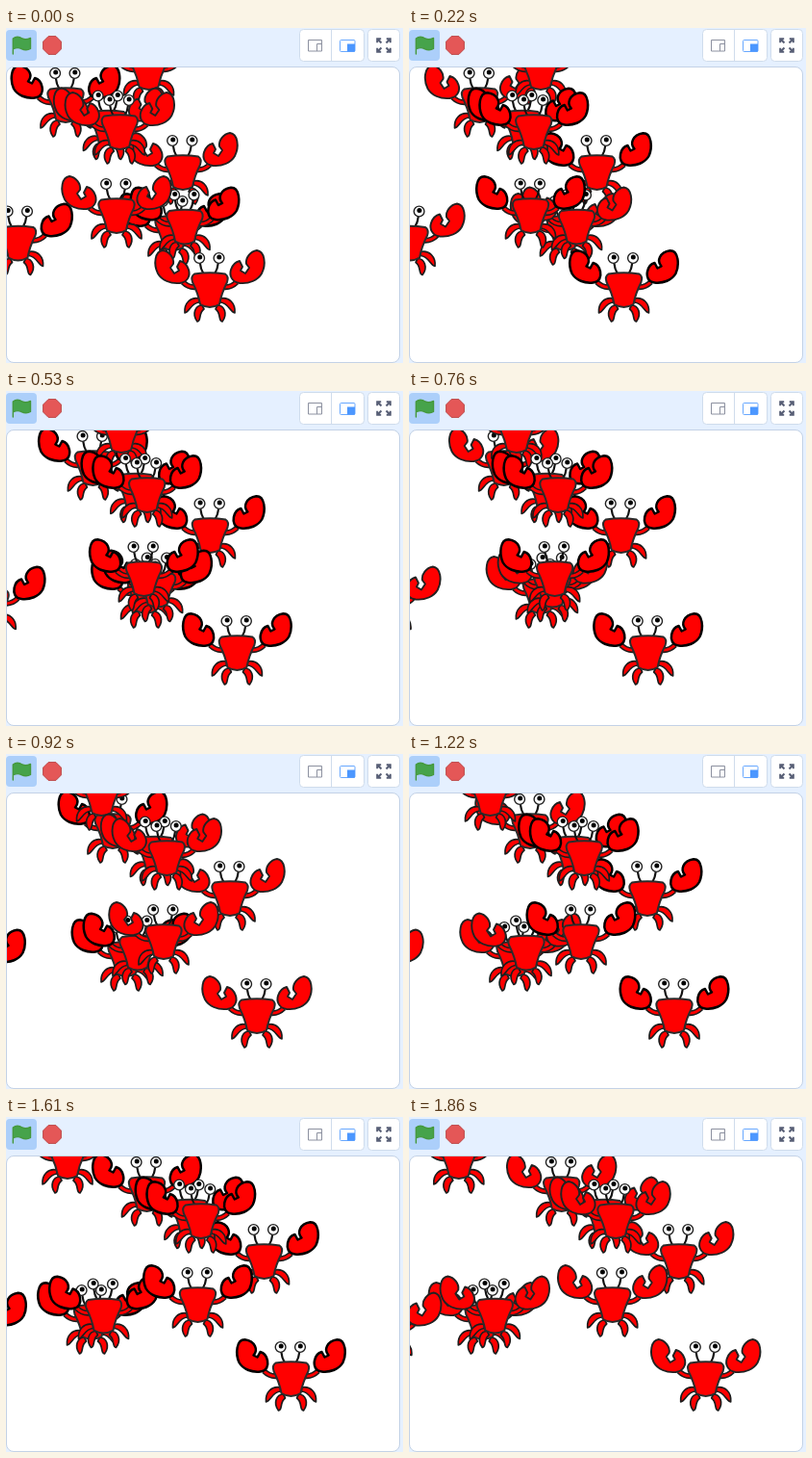
Recreate the animation shown at these times as an HTML page. Size 413 by 348 pixels, loop 1930 ms.

```html
<!DOCTYPE html>
<html lang="en">
<head>
<meta charset="utf-8">
<title>Crabs</title>
<style>
html, body { margin: 0; width: 100%; height: 100%; overflow: hidden; background: #e5f0ff; }
svg { display: block; width: 413px; height: 348px; }
</style>
</head>
<body>
<svg viewBox="0 0 413 348" xmlns="http://www.w3.org/2000/svg">
  <defs>
    <clipPath id="stage"><rect x="1" y="41" width="408.5" height="306" rx="7"/></clipPath>
    <g id="limbs" fill="#f00" stroke="#1c1c1c" stroke-width="1.7" stroke-linejoin="round">
      <path d="M11 13C20 11 27 18 26 28C21 27 20 18 11 17Z"/>
      <path d="M8 20C15 20 19 29 13 37C8.500 36 12 28 6 24Z"/>
      <path d="M14 1Q22 2 28 -4" fill="none" stroke-width="6"/>
      <path d="M14 1Q22 2 28 -4" fill="none" stroke="#f00" stroke-width="2.6"/>
    </g>
    <g id="eye">
      <path d="M9.500 -24Q9 -18 5.500 -12" fill="none" stroke="#111" stroke-width="2.2"/>
      <circle cx="10.2" cy="-29" r="5.4" fill="#fff" stroke="#222" stroke-width="1.4"/>
    </g>
    <g id="body">
      <use href="#limbs"/>
      <use href="#limbs" transform="scale(-1 1)"/>
      <g transform="translate(-.7)">
        <use href="#eye"/>
        <use href="#eye" transform="scale(-1 1)"/>
        <circle cx="-9.600" cy="-30" r="2.5"/>
        <circle cx="10.500" cy="-30" r="2.5"/>
      </g>
      <path d="M-16 -12.500Q0 -15 16 -12.500Q20 -10 18 -4Q12 8 10 19Q0 25 -10 19Q-12 8 -18 -4Q-20 -10 -16 -12.500Z" fill="#f00" stroke="#2b2b2b" stroke-width="2"/>
    </g>
    <path id="openClaw" fill="#f00" stroke="#222" stroke-width="1.9" stroke-linejoin="round" d="M49 -37C57 -36 59 -23 54 -13C50 -6 41 -2 31 -3C23 -4 20 -11 22 -17C24 -23 27 -25 31 -26L34 -20L32 -16L37 -13L41 -19L38 -23C37 -29 42 -36 49 -37Z"/>
    <path id="closedClaw" fill="#f00" stroke="#000" stroke-width="2.5" stroke-linejoin="round" d="M48 -36.800C57 -37 58 -22 54 -13C50 -6 41 -2.500 32 -3.500C25 -4 23.500 -10 24.500 -15C25.500 -20 28 -23 32 -24L35 -18.500L39 -20.500C34 -26 37 -35 48 -36.800Z"/>
    <g id="open">
      <use href="#body"/>
      <use href="#openClaw"/>
      <use href="#openClaw" transform="scale(-1 1)"/>
    </g>
    <g id="closed">
      <use href="#body"/>
      <use href="#closedClaw"/>
      <use href="#closedClaw" transform="scale(-1 1)"/>
    </g>
    <path id="arrow" d="M2.500 -2.500L6.500 -6.500M2.800 -6.800H6.800V-2.800" fill="none" stroke="#575e75" stroke-width="2"/>
  </defs>

  <rect width="413" height="348" fill="#e5f0ff"/>
  <rect x="0" y="2" width="32" height="32" rx="4" fill="#accffa"/>
  <path d="M7.300 27V11C11 8 14 9 17 11C20 12.500 22 12 25.500 10.500V21.500C22 23.500 19 23 16 21.500C13 20 10 20.500 7.300 22" fill="#46a34b" stroke="#45993d" stroke-width="1.4" stroke-linecap="round" stroke-linejoin="round"/>
  <path d="M44.100 8.600H51.900L57.400 14.100V21.900L51.900 27.400H44.100L38.600 21.900V14.100Z" fill="#e45757" stroke="#bd4b4b" stroke-linejoin="round"/>

  <g fill="#fff" stroke="#cfdcec">
    <rect x="305.500" y="1.500" width="67" height="33" rx="4"/>
    <path d="M338.500 2V34"/>
    <rect x="376.500" y="1.500" width="33" height="33" rx="4"/>
  </g>
  <path d="M314.500 12.500H328.500V24H314.500ZM323.500 24V16.500H328.500" fill="#fff" stroke="#8c91a0"/>
  <rect x="347.500" y="12.500" width="15.500" height="12" rx="1" fill="#fff" stroke="#68a8ff"/>
  <rect x="355" y="16.500" width="8" height="8" fill="#4c97ff"/>
  <g transform="translate(393 18)">
    <use href="#arrow"/>
    <use href="#arrow" transform="rotate(90)"/>
    <use href="#arrow" transform="rotate(180)"/>
    <use href="#arrow" transform="rotate(270)"/>
  </g>

  <rect x=".5" y="40.500" width="409" height="307" rx="7.500" fill="#fff" stroke="#c3d2e6"/>
  <g clip-path="url(#stage)"><g id="crabs"></g></g>
</svg>
<script>
const LOOP = 1930;
const SNAP = 500; // one open-and-close of the claws
const starts = [0, 80, 150, 220, 300, 380, 450, 530, 610, 690, 770, 840, 920,
  990, 1070, 1150, 1220, 1300, 1380, 1460, 1530, 1610, 1700, 1780, 1860];
// Distance walked, as [step, pixels]
const walk = [[0, 0], [3, 11.5], [7, 28.4], [12, 49], [16, 64], [21, 84.5], [24, 96.7]];

const right = x => d => x + d;
const left = x => d => x - d;
// Held at the stage edge before turning back
const bounce = d => Math.max(12.5 - d, d - 120, -42);

// Times at which the claws open, for the two groups of crabs
const early = 140, late = 265;

// Back to front: [x as a function of distance, y, opening time]
const crabs = [
  [right(62), 76, early],
  [left(148.5), 42, early],
  [right(184), 146, late],
  [left(174), 209, early],
  [left(186), 202.5, early],
  [bounce, 219.5, early],
  [right(115), 191, late],
  [right(106.5), 99.5, late],
  [right(118.3), 104, late],
  [right(212), 268, late]
];

const layer = document.getElementById("crabs");
const nodes = crabs.map(() =>
  layer.appendChild(document.createElementNS("http://www.w3.org/2000/svg", "use")));

function distance(step) {
  const i = Math.max(1, walk.findIndex(([s]) => s >= step));
  const [s0, d0] = walk[i - 1], [s1, d1] = walk[i];
  return d0 + (d1 - d0) * (step - s0) / (s1 - s0);
}

function draw(time) {
  const t = time % LOOP;
  const step = starts.filter(s => s <= t).length - 1;
  const d = distance(step);
  crabs.forEach(([x, y, opening], i) => {
    const isOpen = (starts[step] - opening + SNAP) % SNAP < SNAP / 2;
    nodes[i].setAttribute("href", isOpen ? "#open" : "#closed");
    nodes[i].setAttribute("transform", `translate(${x(d)} ${y})`);
  });
}

const begin = performance.now();
function tick() {
  draw(performance.now() - begin);
  requestAnimationFrame(tick);
}
tick();
</script>
</body>
</html>
```
